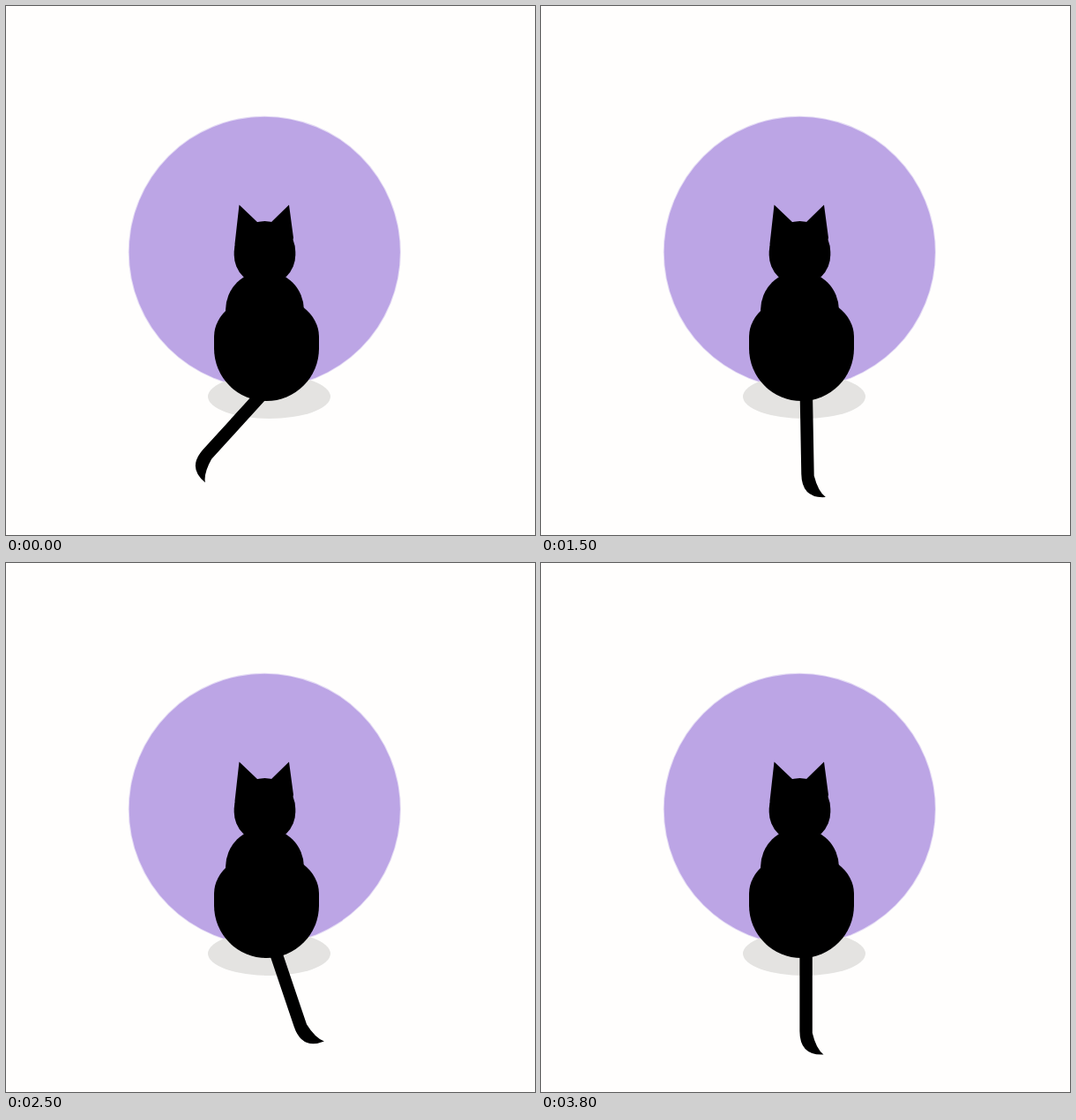
Write an HTML page that moves like this. It is 600 px wide and 600 px high and loops after 3900 ms.

```html
<!DOCTYPE html>
<html lang="en">
<head>
<meta charset="utf-8">
<title>Cat with a swinging tail</title>
<style>
  html, body { margin: 0; width: 100%; height: 100%; overflow: hidden; background: #fffefd; }
  svg { display: block; width: 100%; height: 100%; }
</style>
</head>
<body>
<svg viewBox="0 0 600 600">
  <circle cx="293.3" cy="279.3" r="153.6" fill="#bca5e5" stroke="#bca5e5" stroke-opacity=".4" stroke-width="2"/>
  <ellipse cx="298.5" cy="443" rx="69.5" ry="25" fill="#e4e3e1"/>
  <path id="tail" d="M293.4 427H307.8V533Q312 551 320.5 557.5Q293.5 559 293.4 531Z"/>
  <!-- ears, head, shoulders, body -->
  <path d="M264.5 225.5L285 245H301L321 225.5L326 263L320 285H265L259.5 270Z"/>
  <rect x="258.7" y="244" width="69.6" height="73" rx="34.8"/>
  <circle cx="293.5" cy="345" r="44.5"/>
  <path d="M236 375A59.5 46.5 0 0 1 355 375V388.5A59.5 59.5 0 0 1 236 388.5Z"/>
</svg>
<script>
  const LOOP = 3900, STEP = 100;
  const tail = document.getElementById('tail');

  // Each swing: start ms, end ms, from degrees, to degrees
  const swings = [
    [-155, 755, 45, 0],
    [1410, 2245, 0, -45],
    [2245, 2925, -45, 45],
    [2925, 3790, 45, 0]
  ];

  // cubic-bezier(.42, 0, .58, 1)
  function easeInOut(x) {
    let lo = 0, hi = 1;
    for (let i = 0; i < 24; i++) {
      const u = (lo + hi) / 2, v = 1 - u;
      if (3 * v * v * u * .42 + 3 * v * u * u * .58 + u ** 3 < x) lo = u;
      else hi = u;
    }
    return lo * lo * (3 - 2 * lo);
  }

  function angleAt(t) {
    const swing = swings.find(([start, end]) => t >= start && t < end);
    if (!swing) return 0;
    const [start, end, from, to] = swing;
    return from + (to - from) * easeInOut((t - start) / (end - start));
  }

  const begin = performance.now();
  function draw() {
    const t = (performance.now() - begin) % LOOP;
    const held = Math.floor(t / STEP) * STEP;
    tail.setAttribute('transform', `rotate(${angleAt(held)} 295 427)`);
    requestAnimationFrame(draw);
  }
  draw();
</script>
</body>
</html>
```
